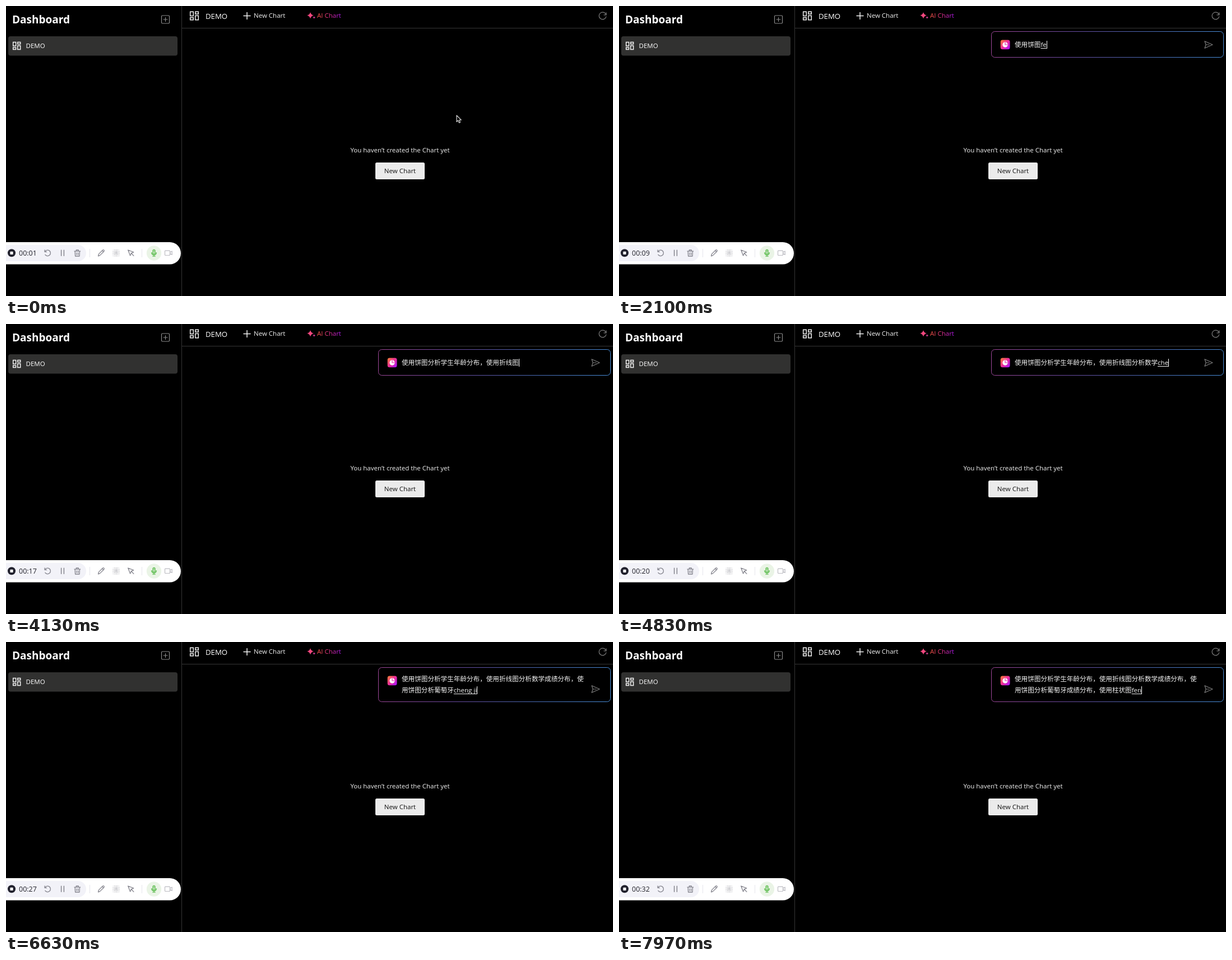
These frames come from a looping animation (1083x517 px, 8000 ms). An HTML page with a canvas:

```html
<!DOCTYPE html>
<html lang="zh-CN">
<head>
<meta charset="utf-8">
<title>Dashboard</title>
<style>
html, body { margin: 0; width: 100%; height: 100%; overflow: hidden; background: #000; }
canvas { display: block; width: 1083px; height: 517px; }
</style>
</head>
<body>
<canvas id="stage"></canvas>
<script>
const W = 1083, H = 517, LOOP = 8000;
const FONT = '"Open Sans", "Noto Sans CJK SC", "Noto Sans CJK", sans-serif';
const canvas = document.getElementById('stage');
const ctx = canvas.getContext('2d');
const dpr = window.devicePixelRatio || 1;
canvas.width = W * dpr;
canvas.height = H * dpr;

// keys typed, text they become, start and commit time
const TYPING = [
  ['shi yong', '使用', 1050, 1450],
  ['bing tu', '饼图', 1500, 1940],
  ['fen xi', '分析', 2000, 2420],
  ['xue sheng', '学生', 2480, 2850],
  ['nian ling', '年龄', 2880, 3200],
  ['fen bu', '分布', 3230, 3480],
  ['', ',', 3520, 3520],
  ['shi yong', '使用', 3560, 3780],
  ['zhe xian tu', '折线图', 3800, 4080],
  ['fen xi', '分析', 4180, 4420],
  ['shu xue', '数学', 4450, 4700],
  ['cheng ji', '成绩', 4730, 4980],
  ['fen bu', '分布', 5010, 5200],
  ['', ',', 5260, 5260],
  ['shi yong', '使用', 5290, 5535],
  ['bing tu', '饼图', 5570, 5770],
  ['fen xi', '分析', 5800, 6020],
  ['pu tao ya', '葡萄牙', 6060, 6370],
  ['cheng ji', '成绩', 6400, 6650],
  ['fen bu', '分布', 6700, 6900],
  ['', ',', 6950, 6950],
  ['shi yong', '使用', 6990, 7240],
  ['zhu zhuang tu', '柱状图', 7280, 7780],
  ['fen xi', '分析', 7850, 8100]
].map(([keys, out, from, to]) => ({ keys, out: out.replace(',', '\uff0c'), from, to }));

const OPEN = 390, FOCUS = 880, TYPE = 1050;
const PATH = [[0, 804, 195], [90, 804, 195], [330, 566, 16], [430, 566, 16], [700, 748, 71], [770, 752, 72], [TYPE, 752, 72]];

function text(str, x, y, size, color, weight = 400, align = 'left') {
  ctx.font = `${weight} ${size}px ${FONT}`;
  ctx.textAlign = align;
  ctx.fillStyle = color;
  ctx.fillText(str, x, y);
}

function box(x, y, w, h, r, fill) {
  ctx.beginPath();
  ctx.roundRect(x, y, w, h, r);
  ctx.fillStyle = fill;
  ctx.fill();
}

function disc(x, y, r, fill) {
  ctx.beginPath();
  ctx.arc(x, y, r, 0, Math.PI * 2);
  ctx.fillStyle = fill;
  ctx.fill();
}

// strokes an SVG path placed at x, y
function icon(d, x, y, color, width = 1.3, fill) {
  const p = new Path2D(d);
  ctx.save();
  ctx.translate(x, y);
  ctx.lineWidth = width;
  ctx.lineCap = ctx.lineJoin = 'round';
  ctx.strokeStyle = color;
  if (fill) {
    ctx.fillStyle = fill;
    ctx.fill(p);
  }
  if (width) ctx.stroke(p);
  ctx.restore();
}

function blend(x0, y0, x1, y1, ...colors) {
  const g = ctx.createLinearGradient(x0, y0, x1, y1);
  colors.forEach((c, i) => g.addColorStop(i / (colors.length - 1), c));
  return g;
}

function tiles(x, y, s) {
  ctx.strokeStyle = '#f2f2f2';
  ctx.lineWidth = 1.5;
  const a = s * 0.38, tall = s * 0.52, low = s * 0.27;
  ctx.beginPath();
  ctx.rect(x, y, a, tall);
  ctx.rect(x + s - a, y, a, low);
  ctx.rect(x, y + s - low, a, low);
  ctx.rect(x + s - a, y + s - tall, a, tall);
  ctx.stroke();
}

function star(x, y, r, color) {
  const k = r * 0.2;
  icon(`M0 ${-r}Q${k} ${-k} ${r} 0Q${k} ${k} 0 ${r}Q${-k} ${k} ${-r} 0Q${-k} ${-k} 0 ${-r}Z`, x, y, color, 0, color);
}

function page() {
  ctx.fillStyle = '#000';
  ctx.fillRect(0, 0, W, H);
  ctx.fillStyle = '#353535';
  ctx.fillRect(313, 0, 1, H);
  ctx.fillRect(314, 39, W - 314, 1);

  text('Dashboard', 11, 31, 19, '#fff', 700);
  icon('M-5.5 -7h11q1.5 0 1.5 1.5v11q0 1.5 -1.5 1.5h-11q-1.5 0 -1.5 -1.5v-11q0 -1.5 1.5 -1.5zM-3.5 0h7M0 -3.5v7', 284.5, 24, '#8c8c8c', 1.2);
  box(4, 54, 302, 34.5, 4, '#313130');
  tiles(12.7, 64.5, 13);
  text('DEMO', 35.5, 74.5, 11.5, '#fff');

  tiles(328.7, 10.2, 14.6);
  text('DEMO', 356, 22.7, 13.2, '#fff');
  icon('M-6 0h12M0 -6v12', 430, 17.5, '#f2f2f2', 1.5);
  text('New Chart', 442, 21, 11.5, '#f2f2f2');
  star(543, 16.8, 5.8, '#f4487f');
  star(549.7, 20.5, 2.3, '#e23fa0');
  text('AI Chart', 555, 21, 11.5, blend(555, 0, 598, 0, '#f2553f', '#e4318a', '#a818e8'));
  icon('M6.2 -1.8A6.4 6.4 0 1 0 6.3 1.4M6.4 -5.6v4h-4', 1064.5, 17.5, '#777', 1.2);

  text("You haven\u2019t created the Chart yet", 703, 261, 11.5, '#f2f2f2', 400, 'center');
  box(659, 279, 88, 30, 2.5, '#ebebeb');
  text('New Chart', 703, 298, 11.5, '#111', 400, 'center');
}

function recorder(t) {
  const gray = '#85858e';
  box(-40, 421, 352, 39.5, 19.75, '#fff');
  box(-40, 426, 183, 29, 14.5, '#f2f2f8');
  disc(10, 440.3, 7, '#22222e');
  box(7.4, 437.7, 5.2, 5.2, 1, '#fff');

  const sec = Math.max(1, Math.floor(0.75 + t / 250));
  text('00:' + String(sec).padStart(2, '0'), 23, 445, 12.5, '#22222a');

  icon('M-5 -2.2A5.2 5.2 0 1 1 -4.6 3M-5.4 -5.4v3.4h3.4', 74.5, 440.3, gray);
  icon('M-2.4 -5v10M2.4 -5v10', 101, 440.3, gray, 1.5);
  icon('M-5.3 -3.3h10.6M-2 -3.5v-2h4v2M-4.2 -3.2l.5 8.7h7.4l.5 -8.7M-1.4 -.5v3.5M1.4 -.5v3.5', 127.3, 440.5, gray);
  icon('M-5.5 5.5l.8 -3.4 7.4 -7.4q1.1 -.9 2.1 .1t.1 2.1l-7.4 7.4zM1.6 -4.2l2.4 2.4', 170, 440.3, gray);
  for (let i = -2; i <= 2; i++) {
    for (let j = -2; j <= 2; j++) {
      const far = Math.hypot(i, j);
      disc(196.5 + i * 2.7, 440.3 + j * 2.7, Math.max(0.4, 1 - far * 0.2), gray);
    }
  }
  icon('M-5 -5.3l10 3.8 -4.2 1.8 -1.9 4.4zM.9 .5l4.2 4.6', 222.7, 440.3, gray);
  ctx.fillStyle = '#e6e6ec';
  ctx.fillRect(149, 433, 1, 15);
  ctx.fillRect(242, 433, 1, 15);

  disc(264, 440.5, 13.2, '#eaf4e6');
  icon('M-2 -3.6a2 2 0 0 1 4 0v3.6a2 2 0 0 1 -4 0zM-4.4 -.4a4.4 4.4 0 0 0 8.8 0M0 4v2.2M-2.2 6.2h4.4', 264, 440, '#65bf58', 1.3, '#a9dca1');
  icon('M-5.5 -4.2h7q1 0 1 1v6.4q0 1 -1 1h-7q-1 0 -1 -1v-6.4q0 -1 1 -1zM2.8 -1l3.4 -2.2v6.4l-3.4 -2.2', 290, 440.3, '#bcbcc2', 1.2);
}

// first n letters, keeping the spaces between syllables
function head(keys, n) {
  let s = '';
  for (const c of keys) {
    if (c !== ' ' && n-- <= 0) break;
    s += c;
  }
  return s.trim();
}

function typed(t) {
  let done = '', draft = '';
  for (const { keys, out, from, to } of TYPING) {
    if (t >= to) done += out;
    else if (t >= from) {
      const n = keys.replace(/ /g, '').length;
      draft = head(keys, 1 + Math.floor((t - from) / (to - from) * n));
    }
  }
  return { done, draft };
}

function prompt(t) {
  if (t < OPEN) return;
  const { done, draft } = typed(t);
  const left = 706, size = 11.6, perLine = 28;
  ctx.font = `400 ${size}px ${FONT}`;
  const width = s => ctx.measureText(s).width;
  const rows = [done.slice(0, perLine)];
  if (done.length > perLine) rows.push(done.slice(perLine));
  else if (draft && left + width(done + draft) > 1033) rows.push('');
  const two = rows.length > 1;

  ctx.beginPath();
  ctx.roundRect(664.5, 45.5, 414, two ? 61 : 46, 6);
  ctx.lineWidth = 1;
  ctx.strokeStyle = t < FOCUS ? '#333' : blend(664, 45, 1079, 92, '#a0489a', '#6a4aa0', '#4a6ab4', '#4a90dc');
  ctx.stroke();

  box(680.7, 60.5, 16.8, 16.8, 3.5, blend(681, 62, 697, 76, '#ff7a3c', '#f02c9c', '#a814ff'));
  disc(689, 69, 4.7, '#fff');
  icon('M0 -4.2V0H4.2', 689, 69, '#e42bb0', 1.2);
  icon('M-7 -6.2L7 0L-7 6.2L-4.8 0ZM-4.8 0H1', 1052, two ? 84 : 69, '#7c7c7c', 1.2);

  if (!done && !draft) text('Dashboard Generation', left, 73, 11.3, '#555');
  const base = two ? 70 : 73;
  rows.forEach((row, i) => text(row, left, base + i * 20, size, '#f4f4f4'));
  if (t < FOCUS) return;

  const y = base + (rows.length - 1) * 20;
  const x = left + width(rows[rows.length - 1]);
  const end = x + width(draft);
  if (draft) {
    text(draft, x, y, size, '#f4f4f4');
    ctx.fillRect(x, y + 2, end - x, 1);
  }
  ctx.fillStyle = '#fff';
  ctx.fillRect(Math.round(end), y - 11, 1, 14);
}

function pointer(t) {
  if (t >= TYPE) return;
  const i = PATH.findIndex(p => p[0] > t);
  const [t0, x0, y0] = PATH[i - 1], [t1, x1, y1] = PATH[i];
  const p = (t - t0) / (t1 - t0), e = p * p * (3 - 2 * p);
  const x = x0 + (x1 - x0) * e, y = y0 + (y1 - y0) * e;
  if (t >= OPEN && x > 700 && y > 46) {
    const beam = 'M-2.8 -6.5Q0 -6.5 0 -5Q0 -6.5 2.8 -6.5M0 -5V5M-2.8 6.5Q0 6.5 0 5Q0 6.5 2.8 6.5M-1.7 1.5h3.4';
    icon(beam, x, y, '#000', 2.6);
    icon(beam, x, y, '#bbb', 1.2);
  } else {
    icon('M0 0V11.4L2.6 9L4.5 13.2L6.5 12.3L4.7 8.2H8.2Z', x, y, '#e4e4e4', 1.1, '#0a0a0a');
  }
}

const start = performance.now();
function draw() {
  const t = (performance.now() - start) % LOOP;
  ctx.setTransform(dpr, 0, 0, dpr, 0, 0);
  page();
  recorder(t);
  prompt(t);
  pointer(t);
  requestAnimationFrame(draw);
}
draw();
</script>
</body>
</html>
```
